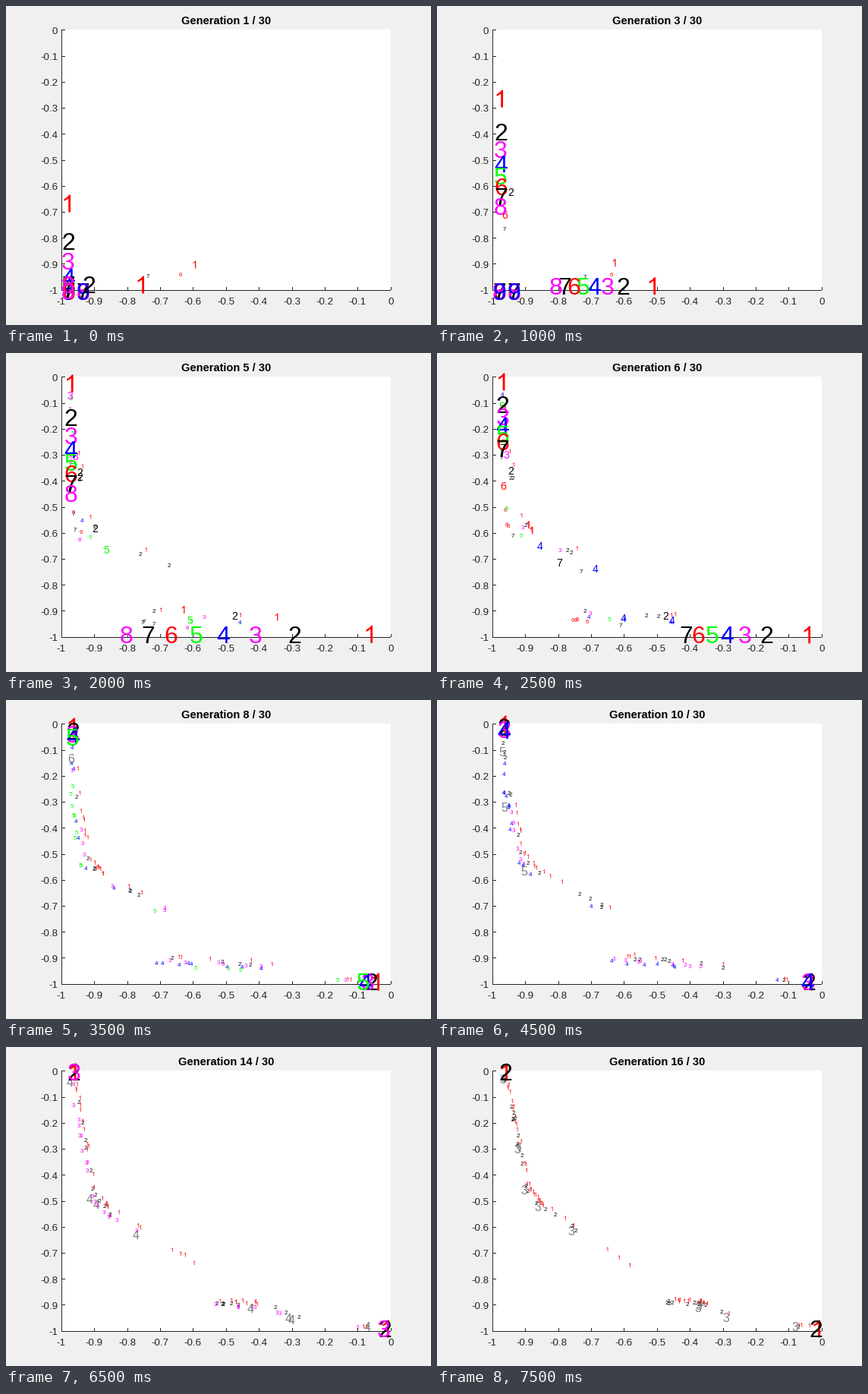
Recreate the animation shown at these times as a matplotlib script. Size 560 by 420 pixels, loop 8000 ms.

```python
import random

import numpy as np
import matplotlib.pyplot as plt
from matplotlib.animation import FuncAnimation
from matplotlib.patches import Polygon, Rectangle

W, H, DPI = 560, 420, 100
PX = 72 / DPI                                  # points per pixel
FRAMES, STEP = 16, 500
X0, X1, Y0, Y1 = 72.8, 506.8, 373.8, 31.5      # axes box
INK = "#262626"
COLORS = ["red", "black", "magenta", "blue", "lime"]
ONE = np.array([(.373, 0), (.285, 0), (.285, .56), (.109, .455),
                (.109, .54), (.24, .625), (.316, .716), (.373, .716)])

# Branches of the front, early and late, as key points
UPPER = ([(88, 40), (97, 128), (108, 205), (127, 230), (187, 255), (226, 271)],
         [(91, 34), (105, 96), (122, 185), (140, 208), (200, 248), (256, 290)])
LOWER = ([(190, 336), (285, 341), (390, 351)],
         [(305, 333), (362, 336), (390, 351)])
TAIL = ([(440, 369), (474, 370)], [(478, 368), (492, 368)])

# Gap of the leaders to their final place, and its spread over the ranks
KEYS = [1, 3, 4, 5, 6, 8, 10, 12, 14]
TOP_GAP = [227, 89, 47, 7, 5, 2, -1, 0, 0]
TOP_SPREAD = [50, 44, 44, 45, 30, 6, 4, 1, 0]
LOW_GAP = [323, 217, 196, 22, 13, 13, 10, 4, 0]
LOW_SPREAD = [70, 40, 44, 100, 55, 8, 2, 4, 3]

plt.rcParams["font.family"] = "Liberation Sans"


def ranks(gen):
    return min(8, round(40 / gen))


def mark(rank, x, y, size, color=None):
    return rank, x, y, size, color or COLORS[(rank - 1) % 5]


def gap(gen, base, spread, rank):
    return (np.interp(gen, KEYS, base)
            + np.interp(gen, KEYS, spread) * (rank - 1) ** 0.6)


def leaders(gen):
    """Best digits of each rank, racing to both ends of the front."""
    top, low = [], []
    for r in range(1, ranks(gen) + 1):
        x = np.interp(gen, [1, 3, 8, 16], [82, 84, 88, 90])
        y = min(375, 33 + gap(gen, TOP_GAP, TOP_SPREAD, r))
        top.append(mark(r, x, y, 32))
        x = max(82, 502 - gap(gen, LOW_GAP, LOW_SPREAD, r))
        y = np.interp(gen, [1, 6], [367, 371])
        low.append(mark(r, x, y, 32))
    return top + low


def corner(gen):
    if gen > 4:
        return []
    return [mark(r, x, 376, 32) for x in (82, 101) for r in range(6, 10)]


def along(branch, t, u):
    pts = np.array(branch[0]) * (1 - t) + np.array(branch[1]) * t
    at = u * (len(pts) - 1)
    knots = range(len(pts))
    return np.interp(at, knots, pts[:, 0]), np.interp(at, knots, pts[:, 1])


def crowd(gen):
    """Small digits strewn behind the front, each replaced after a few turns."""
    out = []
    t = np.clip((gen - 7) / 9, 0, 1)
    count = int(np.interp(gen, [2, 3, 5, 8, 16], [3, 7, 42, 82, 95]))
    for i in range(count):
        rng = random.Random(97 * i + (gen + i) // 4)
        u = rng.random() * min(1, 0.35 + i / 60)
        rank = 1 + int(ranks(gen) * rng.random() ** 1.2)
        branch = LOWER if i % 10 < 3 else UPPER
        if gen > 6 and i % 20 == 9:
            branch = TAIL
        x, y = along(branch, t, u)
        if branch is UPPER:
            y += np.interp(gen, KEYS, TOP_GAP)
        size, color = 8, None
        if gen < 7 and rng.random() < 0.3:
            size = 14
        if i % 11 == 5 and i < 12 * (gen - 7):
            rank, size, color = ranks(gen) + 1, 16, "0.5"
        lag = 3 * (rank - 1)
        x = max(x - lag + rng.uniform(-2, 2), 83 + rng.random() * 6)
        y = min(y + lag + rng.uniform(-2, 2), 368)
        out.append(mark(rank, x, y, size, color))
    return out


fig = plt.figure(figsize=(W / DPI, H / DPI), dpi=DPI, facecolor="#f0f0f0")
ax = fig.add_axes([0, 0, 1, 1])
ax.set(xlim=(0, W), ylim=(H, 0))
ax.axis("off")


def box(x, y, w, h, color):
    ax.add_patch(Rectangle((x, y), w, h, fc=color, ec="none", zorder=1))


def label(x, y, s, size, **kw):
    return ax.text(x, y, s, fontsize=size * PX, va="baseline", **kw)


def digit(rank, x, y, size, color):
    base = y + 0.358 * size
    if rank > 1:
        return label(x, base, str(rank), size, ha="center", color=color)
    shape = (ONE - (0.278, 0)) * (size, -size) + (x, base)
    return ax.add_patch(Polygon(shape, fc=color, ec="none", zorder=3))


box(73, 31, 434, 343, "white")
box(73, 31, 1, 344, INK)
box(73, 374, 434, 1, INK)
for i in range(11):
    name = f"{(i - 10) / 10:g}"
    x, y = X0 + (X1 - X0) * i / 10, Y0 + (Y1 - Y0) * i / 10
    box(round(x), 370, 1, 4, INK)
    box(73, int(y + 0.4), 5, 1, INK)
    label(x, 393, name, 13.33, ha="center", color=INK)
    label(68, y + 5.2, name, 13.33, ha="right", color=INK)

title = label(289.8, 24, "", 14.67, ha="center", weight="bold", color="black")
shown = []


def update(i):
    gen = i + 1
    while shown:
        shown.pop().remove()
    title.set_text(f"Generation {gen} / 30")
    for z, m in enumerate(crowd(gen) + corner(gen) + leaders(gen)):
        art = digit(*m)
        art.set_zorder(4 + z)
        shown.append(art)
    return [title, *shown]


anim = FuncAnimation(fig, update, frames=FRAMES, interval=STEP,
                     init_func=lambda: [], repeat=True, repeat_delay=0)
plt.show()
```
